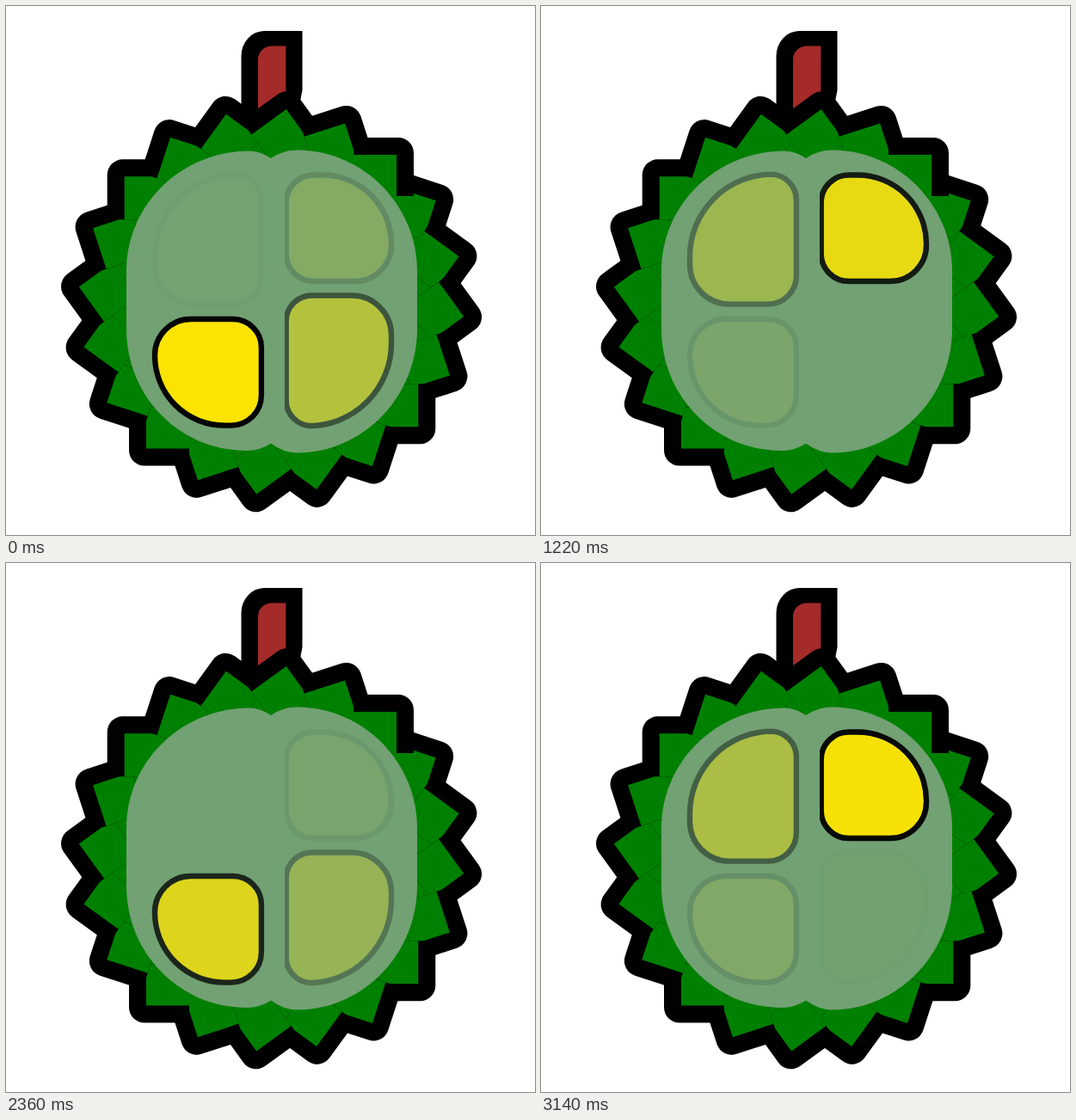
Animation of 615x615 px, one loop 3210 ms. Source, as an HTML page:

```html
<!DOCTYPE html>
<html lang="en">
<head>
<meta charset="utf-8">
<title>Fruit loader</title>
<style>
  html, body { margin: 0; width: 100%; height: 100%; overflow: hidden; background: #fff; }
  svg { display: block; width: 100%; height: 100%; }
  .seed { fill: #ffe600; stroke: #000; stroke-width: 6.4; }
</style>
</head>
<body>
<svg viewBox="0 0 615 615">
  <defs>
    <clipPath id="half"><rect x="324" y="180" width="140" height="330"/></clipPath>
    <g id="spike">
      <path d="M404 153H456A18 18 0 0 1 474 171V221H404Z"/>
      <path fill="#008000" d="M404 173H454V221H404Z"/>
    </g>
  </defs>
  <path d="M273.500 132V58A27 29 0 0 1 300 29H344.500V98L341 116L330 132Z"/>
  <path fill="#a52a2a" d="M293 132V62A16 15.500 0 0 1 309 46.500H325.300V132Z"/>
  <circle cx="308.5" cy="343.8" r="195" fill="#008000"/>
  <g id="spikes"></g>
  <path fill="#72a174" d="M308 177Q322 167.500 338 167.500C415 167.500 478 231 478 308V375
    C478 455 415 519.500 338 519.500Q322 519 308 508.500Q295 517 280 517
    C203 517 140 455 140 375V308C140 231 204 168.500 283 168.500Q297 169 308 177Z"/>
  <g id="left"></g>
  <g id="right" clip-path="url(#half)"></g>
</svg>
<script>
const LOOP = 3210, STEPS = 50, CYCLE = 32, LAG = 8;

function add(parent, tag, attrs) {
  const el = document.createElementNS('http://www.w3.org/2000/svg', tag);
  for (const key in attrs) el.setAttribute(key, attrs[key]);
  return document.getElementById(parent).appendChild(el);
}

// each spike overlaps the one before it
for (let k = 1; k <= 20; k++) {
  add('spikes', 'use', { href: '#spike', transform: `rotate(${k * 18} 308.5 343.8)` });
}

// box with four corner radii, clockwise from the top left
function seed(side, top, bottom, a, b, c, d) {
  const [x0, x1] = side === 'left' ? [173, 296.9] : [325.7, 448];
  const arc = (r, x, y) => `A${r} ${r} 0 0 1 ${x} ${y}`;
  const path = `M${x0 + a} ${top}H${x1 - b}` + arc(b, x1, top + b) +
    `V${bottom - c}` + arc(c, x1 - c, bottom) +
    `H${x0 + d}` + arc(d, x0, bottom - d) +
    `V${top + a}` + arc(a, x0 + a, top) + 'Z';
  return add(side, 'path', { class: 'seed', d: path });
}

// in the order they light up
const seeds = [
  seed('left', 364, 487.6, 42, 33, 35, 81),
  seed('left', 195.6, 346.6, 96, 30, 33, 46),
  seed('right', 196.5, 320, 32, 80, 42, 32),
  seed('right', 336.5, 488.2, 30, 46, 96, 30)
];

// cubic-bezier(.25, .1, .25, 1)
function ease(x) {
  const bez = (p, q, s) => 3 * p * s * (1 - s) ** 2 + 3 * q * s * s * (1 - s) + s ** 3;
  let lo = 0, hi = 1;
  for (let i = 0; i < 20; i++) {
    const mid = (lo + hi) / 2;
    if (bez(0.25, 0.25, mid) < x) lo = mid; else hi = mid;
  }
  return bez(0.1, 1, lo);
}

// seeds flash one after another and fade out
function draw() {
  const t = performance.now() % LOOP;
  const step = Math.min(STEPS - 1, Math.floor(t / LOOP * STEPS + 0.15));
  seeds.forEach((el, j) => {
    const age = (step + 1.18 - LAG * j + CYCLE) % CYCLE;
    el.setAttribute('opacity', 1 - ease(Math.min(1, age * 0.0338)));
  });
  requestAnimationFrame(draw);
}
draw();
</script>
</body>
</html>
```
